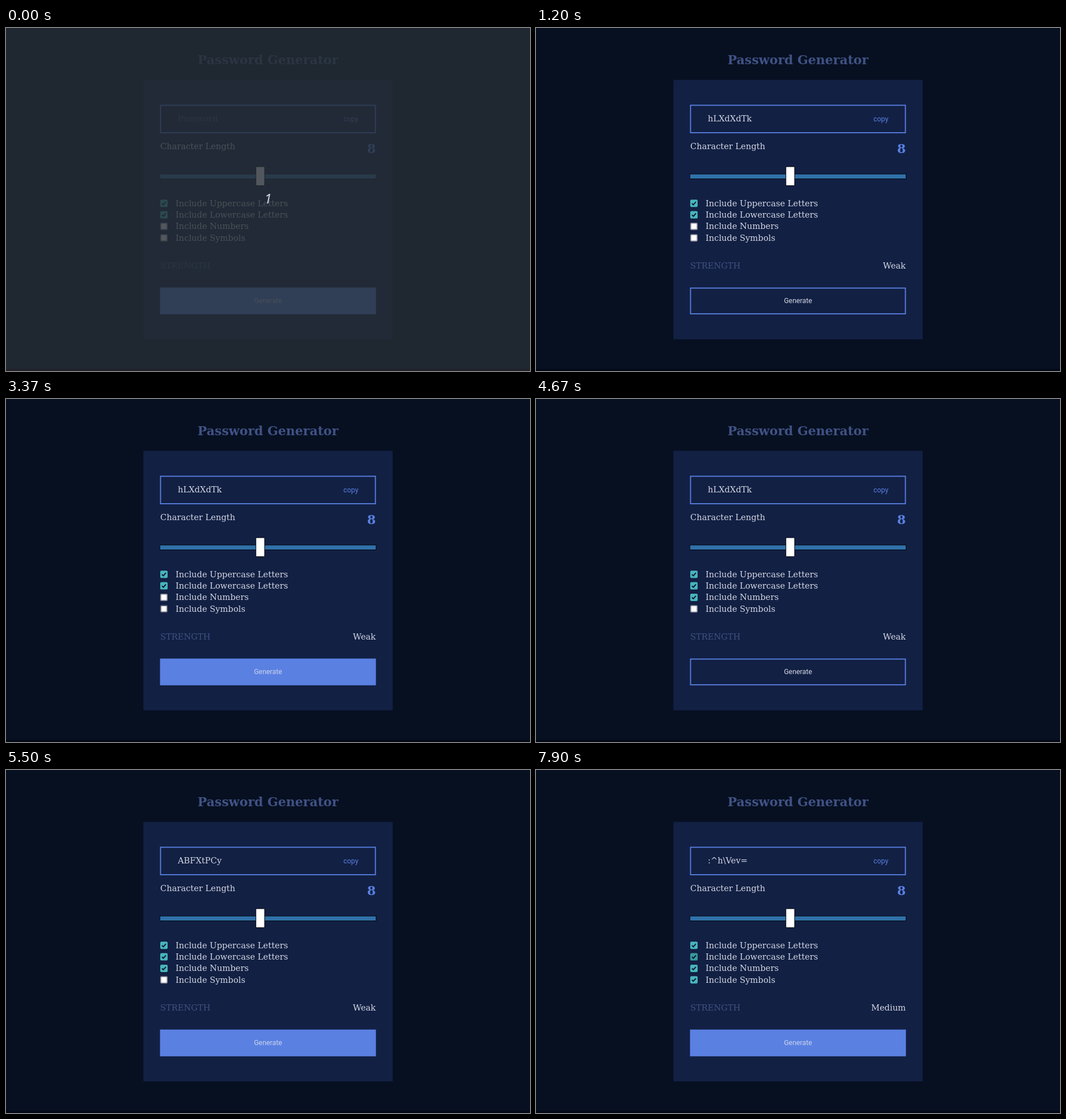
Animation, 924 px wide and 606 px high, one loop 8000 ms. Source, as an HTML page:

```html
<!DOCTYPE html>
<html lang="en">
<head>
<meta charset="utf-8">
<title>Password Generator</title>
<style>
  html, body { margin: 0; width: 100%; height: 100%; overflow: hidden; background: #071021; }
  svg { display: block; }
  text { font: 14.667px "DejaVu Serif", serif; fill: #d4d8e3; white-space: pre; }
  .big { font-size: 22px; font-weight: bold; }
  .dim { fill: #41517f; }
  .accent { fill: #5a80e2; }
  .ui { font: 12.4px Roboto, sans-serif; }
  .end { text-anchor: end; }
  .mid { text-anchor: middle; }
  .frame { fill: none; stroke: #5a80e2; stroke-width: 1.83; }
  .title { fill: #405285; }
  #count { font: italic 23px "Noto Sans", sans-serif; }
</style>
</head>
<body>
<svg width="924" height="606" viewBox="0 0 924 606">
  <rect width="924" height="606" fill="#071021"/>
  <rect x="242.3" y="91.7" width="439.5" height="458.3" fill="#122044"/>
  <text class="big mid title" x="462" y="64">Password Generator</text>

  <rect class="frame" x="272.5" y="136.5" width="378.9" height="48.5"/>
  <text id="password" x="303" y="165"></text>
  <text class="ui accent" x="595" y="165">copy</text>

  <text x="272" y="214">Character Length</text>
  <text class="big accent end" x="652" y="221">8</text>

  <rect x="271.5" y="257.5" width="381.5" height="9.5" fill="#02060d"/>
  <rect x="272" y="258.5" width="380" height="7.5" fill="#3071a9"/>
  <rect x="440.7" y="245" width="15.3" height="33.5" rx="1.5" fill="#fff" stroke="#000"/>

  <g id="options"></g>

  <text class="dim" x="272" y="425">STRENGTH</text>
  <text id="strength" class="end" x="652" y="425"></text>

  <rect id="button" class="frame" x="272.5" y="459.5" width="378.9" height="45.4"/>
  <text id="label" class="ui mid" x="462" y="486">Generate</text>

  <g id="intro">
    <rect width="924" height="606" fill="#262e34" opacity=".8"/>
    <text id="count" class="mid" x="462" y="310">1</text>
  </g>
  <rect id="edge" y="602.5" width="924" height="3.5"/>
</svg>
<script>
const LOOP = 8000;
const $ = id => document.getElementById(id);
const within = (t, spans) => spans.some(([from, to]) => t >= from && t < to);

// Pointer over the generate button
const buttonHover = [[430, 2070], [4670, 4730], [5000, 5500], [7130, 7800]];

const options = [
  { name: 'Uppercase Letters', checkedAt: 0, press: [], hover: [] },
  { name: 'Lowercase Letters', checkedAt: 0, press: [], hover: [[7900, LOOP]] },
  { name: 'Numbers', checkedAt: 4200, press: [[4030, 4200]],
    hover: [[2200, 2270], [3830, 4570], [7870, 7900]] },
  { name: 'Symbols', checkedAt: 6770, press: [[6600, 6770]],
    hover: [[2130, 2200], [3370, 3500], [3770, 3830], [4600, 4630], [6300, 7070]] },
];

$('options').innerHTML = options.map(({ name }, i) => `
  <g transform="translate(272 ${303.3 + 20.3 * i})">
    <rect x=".9" y=".9" width="11.2" height="11.2" rx="1.3" stroke-width="1.8"/>
    <path d="M3 6.6 5.4 9 10 3.9" fill="none" stroke="#0a1529" stroke-width="1.9"/>
  </g>
  <text x="299" y="${Math.round(314.8 + 20.3 * i)}">Include ${name}</text>`).join('');
const boxes = [...document.querySelectorAll('#options g')];

function drawOption(option, box, t) {
  const [square, tick] = box.children;
  const checked = t >= option.checkedAt;
  const hover = within(t, option.hover);
  const teal = hover ? '#38999f' : '#48b5bd';
  const border = within(t, option.press) ? '#484851' : hover ? '#676774' : '#8f8f9d';
  square.setAttribute('fill', checked ? teal : '#fff');
  square.setAttribute('stroke', checked ? teal : border);
  tick.style.display = checked ? '' : 'none';
}

function draw() {
  const t = performance.now() % LOOP;
  const intro = t < 30;
  const hover = within(t, buttonHover);

  $('password').textContent =
    t < 1200 ? 'Password' : t < 5300 ? 'hLXdXdTk' : t < 7570 ? 'ABFXtPCy' : ':^h\\Vev=';
  $('password').style.fill = t < 1200 ? '#41517f' : '';
  $('strength').textContent = t < 1200 ? '' : t < 7570 ? 'Weak' : 'Medium';

  $('button').style.fill = hover ? 'none' : '#5a80e2';
  $('label').style.fill = hover ? '' : '#cbd4ec';
  options.forEach((option, i) => drawOption(option, boxes[i], t));

  $('intro').style.display = intro ? '' : 'none';
  $('edge').style.fill = intro ? '#231f2b' : '#030816';
  requestAnimationFrame(draw);
}
draw();
</script>
</body>
</html>
```
